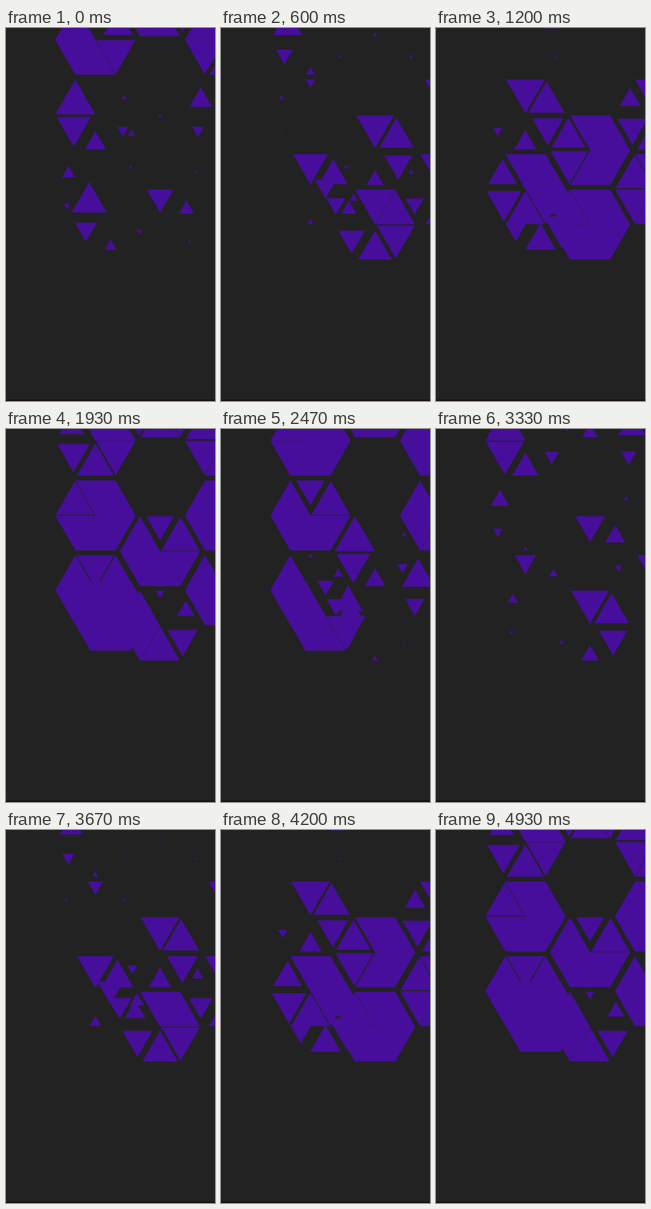
Write an HTML page with a canvas that moves like this. It is 270 px wide and 480 px high and loops after 4.99 s.

```html
<!DOCTYPE html>
<html lang="en">
<head>
<meta charset="utf-8">
<title>Hexagon triangles</title>
<style>
  html, body { margin: 0; width: 100%; height: 100%; overflow: hidden; background: #222; }
  canvas { display: block; width: 270px; height: 480px; }
</style>
</head>
<body>
<canvas id="stage" width="270" height="480"></canvas>
<script>
const ctx = document.getElementById('stage').getContext('2d');

const LOOP = 4990, PERIOD = 3000, STEP = 1000 / 15;
const R = 51.9, H = R * Math.sqrt(3) / 2;
const RAMP = 1000;              // time to grow or shrink
const GROW = 430, SHRINK = 2270; // start times of the first triangle
const STAGGER = 150;            // delay from one triangle to the next, clockwise

// centre x, centre y, delay
const hexes = [
  [115.5, 15, 393], [115.5, 111.2, 0], [115.5, 207.2, -410],
  [199, -34.5, 255], [135, 240.3, -140], [199, 157.2, -540], [199, 253, -815],
  [283, 15, 108], [283, 111.2, -282], [283, 207.2, -705]
];

// cubic-bezier(.25, .1, .25, 1)
function ease(x) {
  if (x <= 0) return 0;
  if (x >= 1) return 1;
  let lo = 0, hi = 1;
  for (let i = 0; i < 24; i++) {
    const u = (lo + hi) / 2, v = 1 - u;
    if (0.75 * u * v * v + 0.75 * u * u * v + u * u * u < x) lo = u; else hi = u;
  }
  const u = lo, v = 1 - u;
  return 0.3 * u * v * v + 3 * u * u * v + u * u * u;
}

function scaleAt(time) {
  const t = (((time - GROW) % PERIOD) + PERIOD) % PERIOD;
  return ease(t / RAMP) - ease((t - (SHRINK - GROW)) / RAMP);
}

// One sixth of a hexagon, scaled about the middle of its outer edge
function addTriangle(cx, cy, side, s) {
  const a = (side * 60 - 90) * Math.PI / 180;
  const nx = Math.cos(a), ny = Math.sin(a);
  const mx = cx + nx * H, my = cy + ny * H;
  const half = s * R / 2;
  ctx.moveTo(mx - nx * H * s, my - ny * H * s);
  ctx.lineTo(mx + ny * half, my - nx * half);
  ctx.lineTo(mx - ny * half, my + nx * half);
  ctx.closePath();
}

function draw(time) {
  ctx.fillStyle = '#222222';
  ctx.fillRect(0, 0, 270, 480);
  ctx.fillStyle = '#1a1114';
  ctx.fillRect(0, 478, 270, 2);
  ctx.fillStyle = '#460e9b';
  ctx.beginPath();
  for (const [x, y, delay] of hexes) {
    for (let side = 0; side < 6; side++) {
      const s = scaleAt(time - delay - side * STAGGER);
      if (s > 0.005) addTriangle(x, y, side, s);
    }
  }
  ctx.fill();
}

const start = performance.now();
function tick() {
  const t = (performance.now() - start) % LOOP;
  draw(Math.floor((t + 3.5) / STEP) * STEP);
  requestAnimationFrame(tick);
}
tick();
</script>
</body>
</html>
```
